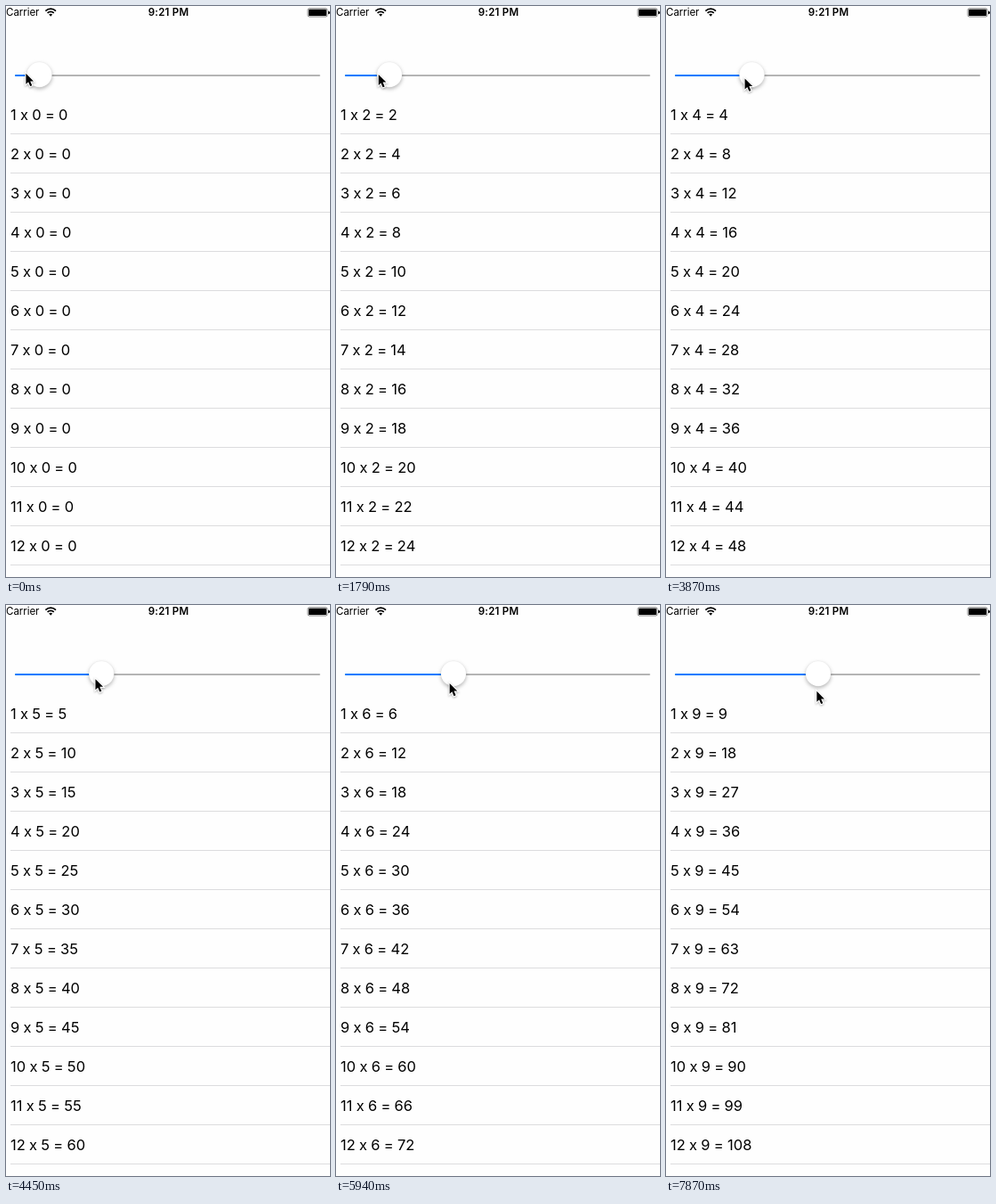
Animation, 364 px wide and 641 px high, one loop 8000 ms. Source, as an HTML page:

```html
<!DOCTYPE html>
<html lang="en">
<head>
<meta charset="utf-8">
<title>Times tables</title>
<style>
  html, body { margin: 0; width: 100%; height: 100%; overflow: hidden; background: #fefefe; }
  svg { display: block; width: 364px; height: 641px; font-family: Inter, "Liberation Sans", sans-serif; }
  #rows text { font-size: 16.5px; letter-spacing: .03px; word-spacing: -.45px; }
  #rows path { stroke: #dcdcde; }
  .bar { font-size: 11.6px; }
  #knob { fill: #fff; filter: drop-shadow(0 2.5px 2px rgba(0, 0, 0, .28)); }
  #cursor { stroke: #fff; stroke-width: 2.2; paint-order: stroke; filter: drop-shadow(0 1px 1px rgba(0, 0, 0, .3)); }
</style>
</head>
<body>
<svg viewBox="0 0 364 641">
  <g class="bar">
    <text x="0" y="11.3" letter-spacing="-.08">Carrier</text>
    <text x="182.5" y="11.3" text-anchor="middle" font-weight="600" letter-spacing=".2">9:21 PM</text>
  </g>
  <g fill="none" stroke="#000" stroke-width="1.7">
    <path d="M44.4 5.6a8.2 8.2 0 0 1 11.6 0M46.6 7.9a5.1 5.1 0 0 1 7.2 0"/>
    <path d="M50.2 11.8L48.2 9.6a2.9 2.9 0 0 1 4 0z" fill="#000" stroke="none"/>
  </g>
  <rect x="339" y="2.8" width="22" height="9.2" rx="1.8" fill="none" stroke="#000" stroke-width=".5"/>
  <rect x="340" y="3.8" width="20" height="7.2" rx=".8"/>
  <path d="M362 5.6q2 .4 2 1.8t-2 1.8z"/>
  <rect x="10" y="77" width="343" height="2" rx="1" fill="#b4b4b4"/>
  <rect id="fill" x="10" y="77" height="2" rx="1" fill="#007aff"/>
  <circle id="knob" cy="77" r="14.2" stroke="#000" stroke-opacity=".07" stroke-width=".6"/>
  <g id="rows"></g>
  <path id="cursor" d="M.4 .8V12.7L3.1 10.2L5.2 15.1L7.3 14.2L5.2 9.4H9Z"/>
</svg>
<script>
const $ = id => document.getElementById(id);
const LOOP = 8000, FIRST = 300, STEP = 148.3;
const LEFT = 37.5, RIGHT = 171;

const pauses = [20, 40, 41, 47, 48];   // steps at which the hand rests
const drag = [                         // moves made, knob x
  [0, LEFT], [8, 55], [11, 60], [19, 89], [24, 96.5], [32, 118], [36, 125], [44, 153], [47, RIGHT]
];

function movesAt(time) {
  const step = Math.floor((time - FIRST) / STEP + 0.05);
  return Math.max(0, step + 1 - pauses.filter(p => p <= step).length);
}

function knobAt(moves) {
  const i = Math.max(1, drag.findIndex(([m]) => m >= moves));
  const [m0, x0] = drag[i - 1], [m1, x1] = drag[i];
  return x0 + (x1 - x0) * (moves - m0) / (m1 - m0);
}

// The pointer catches up with the knob while sinking below it.
function cursorAt(x) {
  const p = (x - LEFT) / (RIGHT - LEFT);
  return [x - 2 - 13.5 * (1 - p) ** 1.3, 75 + 21 * p ** 1.6];
}

for (let i = 0; i < 12; i++) {
  const y = 127.7 + 44 * i;
  $("rows").innerHTML += `<text x="5" y="${y}"></text><path d="M5 ${143.5 + 44 * i}H364"/>`;
}
const labels = document.querySelectorAll("#rows text");
let shown;

function draw(now) {
  const x = knobAt(movesAt(now % LOOP));
  const value = Math.floor((x - 23) / 15.8);
  $("fill").setAttribute("width", x - 10);
  $("knob").setAttribute("cx", x);
  $("cursor").setAttribute("transform", `translate(${cursorAt(x)})`);
  if (value !== shown) {
    shown = value;
    labels.forEach((el, i) => el.textContent = `${i + 1} x ${value} = ${(i + 1) * value}`);
  }
  requestAnimationFrame(draw);
}
draw(performance.now());
</script>
</body>
</html>
```
